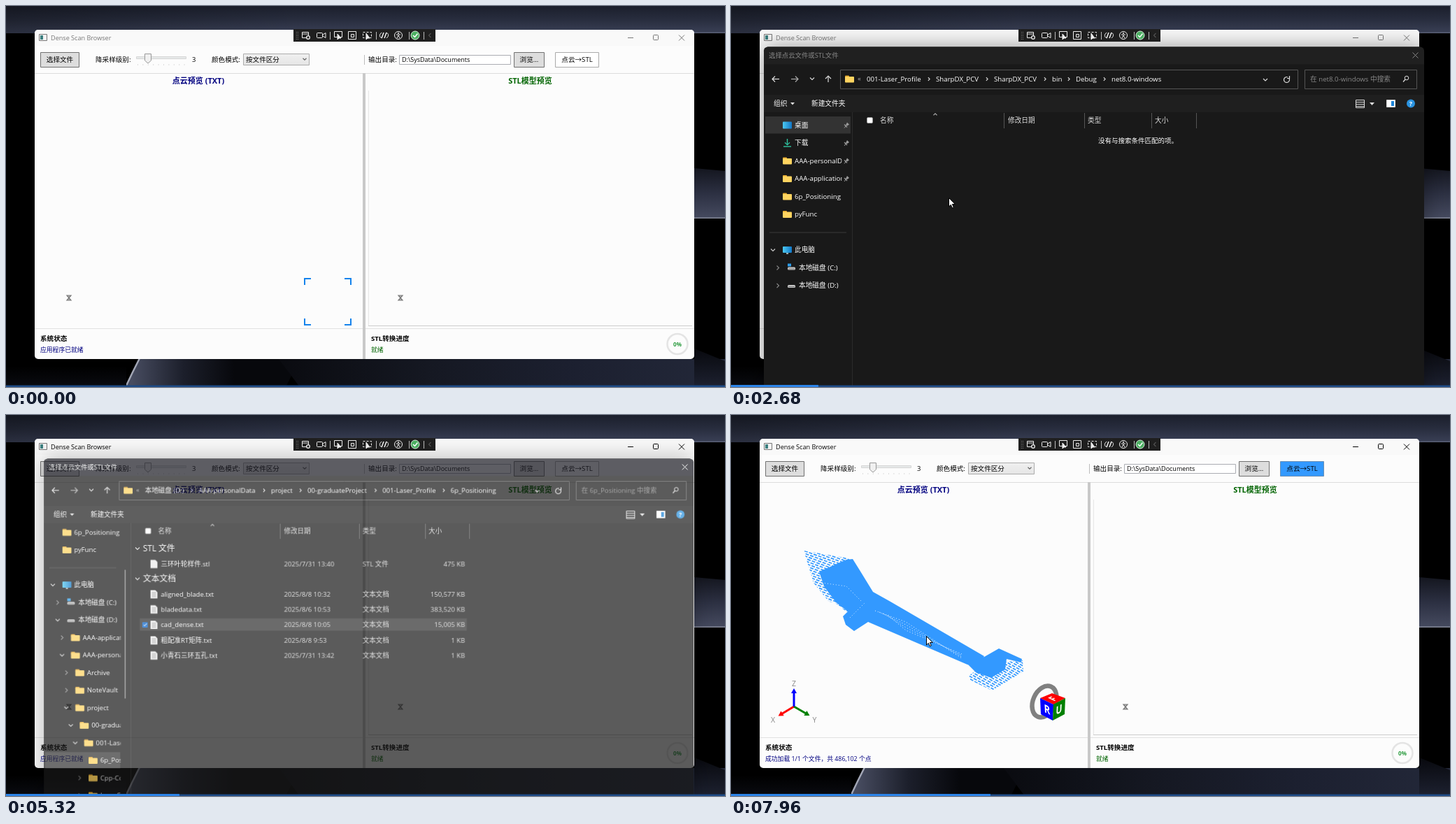
An HTML page with a canvas that plays this animation: 1028x545 px, repeating every 8000 ms.

```html
<!DOCTYPE html>
<html lang="zh-CN">
<head>
<meta charset="utf-8">
<style>
html, body { margin: 0; width: 100%; height: 100%; overflow: hidden; background: #000; }
canvas { display: block; }
</style>
</head>
<body>
<canvas id="stage" width="1028" height="545"></canvas>
<script>
const W = 1028, H = 545, LOOP = 8000, STEP = 40;
const screen2d = document.getElementById('stage').getContext('2d');
const layer = document.createElement('canvas');
layer.width = W; layer.height = 640;
const layer2d = layer.getContext('2d');
let g = screen2d;

// ---- drawing helpers ----
const clamp = v => Math.max(0, Math.min(1, v));
function text(s, x, y, color = '#000', size = 9.7, weight = 400, align = 'left') {
  g.font = `${weight} ${size}px "Open Sans", "Noto Sans CJK SC", "Noto Sans CJK", sans-serif`;
  g.textAlign = align;
  g.fillStyle = color;
  g.fillText(s, x, y + size * 0.36);
}
function box(x, y, w, h, fill, stroke, r = 0) {
  g.beginPath();
  g.roundRect(x, y, w, h, r);
  if (fill) { g.fillStyle = fill; g.fill(); }
  if (stroke) { g.strokeStyle = stroke; g.lineWidth = 1; g.stroke(); }
}
function path(pts, stroke, width = 1, fill, close) {
  g.beginPath();
  for (let i = 0; i < pts.length; i += 2) g.lineTo(pts[i], pts[i + 1]);
  if (close || fill) g.closePath();
  if (fill) { g.fillStyle = fill; g.fill(); }
  if (stroke) { g.strokeStyle = stroke; g.lineWidth = width; g.stroke(); }
}
function circle(x, y, r, fill, stroke, width = 1) {
  g.beginPath();
  g.arc(x, y, r, 0, 7);
  if (fill) { g.fillStyle = fill; g.fill(); }
  if (stroke) { g.strokeStyle = stroke; g.lineWidth = width; g.stroke(); }
}
function ramp(x0, y0, x1, y1, ...colors) {
  const grad = g.createLinearGradient(x0, y0, x1, y1);
  colors.forEach((c, i) => grad.addColorStop(i / (colors.length - 1), c));
  return grad;
}
// dir: 0 right, 1 down, 2 left, 3 up
function chevron(x, y, dir, color = '#ccc', r = 3) {
  g.save();
  g.translate(x, y);
  g.rotate(dir * Math.PI / 2);
  path([-r / 2, -r, r / 2, 0, -r / 2, r], color, 1.1);
  g.restore();
}
function button(x, w, label, fill, border, color = '#000') {
  box(x + .5, 66.5, w, 21, fill, border);
  text(label, x + w / 2 + .5, 77, color, 9.6, 400, 'center');
}

// ---- desktop ----
function wallpaper() {
  box(0, 0, W, H, '#000');
  box(0, 0, W, 39, ramp(0, 0, 0, 39, '#1b1f2c', '#282d3e', '#3a4056'));
  box(0, 0, 420, 39, ramp(0, 0, 420, 0, '#0004', '#0000'));
  box(600, 37.5, 428, 1.5, ramp(600, 0, W, 0, '#3a4056', '#5c6278'));
  path([984, 232, W, 236, W, 304, 984, 304], 0, 0, ramp(0, 232, 0, 304, '#14161f', '#2c3042', '#464b60'));
  box(984, 302.5, 44, 1.5, '#85899a');
  path([191, 505, 420, 505, 400, H, 172, H], 0, 0, ramp(180, 0, 400, 0, '#474c60', '#1c1f2b', '#07080c', '#07080c'));
  path([191, 504, 181, 524, 171, H], '#a3a7b6', 2.5);
  path([390, 505, W, 505, W, 545, 420, 545], 0, 0, ramp(390, 0, W, 0, '#0a0b10', '#151822', '#1c2030', '#232839'));
  path([984, 490, W, 508, W, 545, 984, 545], 0, 0, ramp(0, 490, 0, 545, '#08090e', '#1d2130'));
  box(0, 515, 172, 30, ramp(0, 515, 0, 545, '#000', '#0a0b11'));
}

function recorderBar() {
  const c = '#eee';
  box(411, 33, 203, 18, '#1f1f1f');
  for (let i = 0; i < 10; i++) box(415 + i % 2 * 2, 37 + (i >> 1) * 2.5, 1, 1, '#777');
  [463, 529, 576, 597].forEach(x => box(x, 37, 1, 11, '#bbb'));
  box(423.5, 37.5, 9, 8, 0, c);
  path([423, 40, 433, 40], c);
  circle(432, 45, 2.3, '#1f1f1f', c, 1.3);
  box(444.5, 38.5, 8, 7, 0, c, 1);
  path([453, 41, 457, 38.5, 457, 45.5, 453, 43], c);
  box(469.5, 36.5, 11, 8, 0, c);
  path([474, 40, 474, 48, 476, 46, 479, 46], c, 1, c);
  box(489.5, 36.5, 11, 11, 0, c);
  box(493.5, 40.5, 4, 4, 0, c);
  g.setLineDash([3, 2]);
  box(510.5, 37.5, 12, 8, 0, c);
  g.setLineDash([]);
  path([515, 39, 515, 48, 517, 46, 520, 46], c, 1, c);
  g.strokeStyle = c;
  [[538.5, 1.9, 4.4], [542.5, -1.2, 1.2]].forEach(([x, from, to]) => {
    g.beginPath();
    g.arc(x, 42, 4, from, to);
    g.stroke();
  });
  path([537, 46, 540, 38], c, 1.5);
  path([541, 46, 544, 38], c, 1.5);
  circle(561, 42, 5.5, 0, c);
  path([558, 41, 564, 41], c);
  path([559, 46, 561, 42, 563, 46], c);
  circle(561, 39, 1, c);
  circle(585, 42, 6, '#4caf62', '#d8efdc');
  path([582, 42, 584.5, 44.5, 588.5, 39.5], '#fff', 1.5);
  chevron(606, 42, 2, '#555');
}

// ---- main window ----
const hourglass = x => {
  path([x - 3, 414, x + 3, 414, x - 3, 421, x + 3, 421], '#777', 1.2, '#bbb');
};

function appWindow(t) {
  const active = t >= 5240, ink = active ? '#000' : '#777';
  box(41, 34, 943, 471, '#fcfcfc', 0, 5);
  box(41, 34, 943, 23, '#f9f9f9', 0, 5);
  box(47.5, 40.5, 11, 9, '#f4f4f4', '#777');
  box(49, 42, 4, 6, '#3c8080');
  text('Dense Scan Browser', 64, 46, ink, 9.1);
  path([889, 45.5, 897, 45.5], ink);
  box(925.5, 41.5, 7, 7, 0, ink, 1);
  path([962, 41.5, 970, 49.5], ink);
  path([970, 41.5, 962, 49.5], ink);

  const busy = t >= 5560 && t < 7440;
  const hover = t >= 680 && t < 1400;
  const back = clamp((t - 7440) / 240);
  const shade = Math.round(244 - 23 * back);
  if (busy || (t >= 7440 && back < 1)) button(49, 55, '选择文件', `rgb(${shade},${shade},${shade})`, '#adb2b5', back ? '#444' : '#838383');
  else button(49, 55, '选择文件', hover ? '#bee6fd' : '#ddd', hover ? '#3c7fb1' : '#707070');

  text('降采样级别:', 128, 77, '#000', 9.6);
  box(186.5, 72.5, 71, 3, '#e7eaea', '#d6d6d6');
  for (let i = 0; i < 10; i++) box(188 + i * 7.4, 83, 1, 2, '#ddd');
  path([198.5, 68.5, 207.5, 68.5, 207.5, 78, 203, 82, 198.5, 78], '#999', 1, '#f0f0f0');
  text('3', 266, 77, '#000', 9.4);
  text('颜色模式:', 294, 77, '#000', 9.6);
  box(339.5, 68.5, 94, 16, ramp(0, 68, 0, 85, '#f0f0f0', '#e5e5e5'), '#acacac');
  text('按文件区分', 343, 77, '#000', 9.6);
  chevron(427, 76, 1, '#606060', 2.5);
  box(512, 70, 1, 14, '#bbb');
  text('输出目录:', 518, 77, '#000', 9.6);
  box(562.5, 70.5, 159, 13, '#fff', '#abadb3');
  text('D:\\SysData\\Documents', 566, 77, '#000', 9);
  button(726, 43, '浏览...', '#ddd', '#707070');
  if (t >= 7640) button(785, 62, '点云→STL', '#3399ff', '#6a8fb5');
  else button(785, 62, '点云→STL', '#fff', '#aaa');

  box(41, 96, 943, 1, '#ddd');
  box(510, 96, 4, 409, '#c9c9c9');
  text('点云预览 (TXT)', 275, 107, '#000080', 11, 700, 'center');
  text('STL模型预览', 749.5, 107, '#006400', 11, 700, 'center');
  box(518, 121, 1, 337, '#e6e6e6');
  box(518, 457, 463, 1, '#ccc');
  box(41, 461, 469, 1, '#e2e2e2');
  box(514, 461, 470, 1, '#e2e2e2');
  hourglass(564);

  text('系统状态', 49, 476, '#000', 9.6, 700);
  const status = t < 5560 ? '应用程序已就绪'
    : t < 7200 ? '加载文件 1/1: cad_dense.txt'
    : '成功加载 1/1 个文件，共 486,102 个点';
  text(status, 49, 492, '#000080', 8.8);
  text('STL转换进度', 522, 476, '#000', 9.6, 700);
  text('就绪', 522, 492, '#006400', 8.8);
  circle(960, 483.5, 14.5, 0, '#e4e4e4', 2.5);
  text('0%', 960, 484, '#289a3c', 8, 700, 'center');

  if (t >= 7200) scene();
  else hourglass(90);
  if (t < 200) {
    [[427, 390, 1, 1], [493, 390, -1, 1], [427, 456, 1, -1], [493, 456, -1, -1]].forEach(([x, y, h, v]) =>
      path([x + 9 * h, y, x, y, x, y + 9 * v], '#1583ec', 2));
  }
}

// ---- point cloud, axes and view cube ----
const BLUE = '#3399ff';
function hatch(pts, angle) {
  g.save();
  path(pts, 0, 0, '#0000');
  g.clip();
  g.translate(pts[0], pts[1]);
  g.rotate(angle);
  g.setLineDash([5, 2]);
  for (let i = -40; i < 40; i++) path([-160 + i * 3 % 4, i * 3.3, 160, i * 3.3], BLUE, 1.7);
  g.restore();
}
function arrow(x, y, color) {
  const a = Math.atan2(y - 417, x - 90);
  path([90, 417, x, y], color, 3);
  g.save();
  g.translate(x, y);
  g.rotate(a);
  path([4, 0, -3, -4, -3, 4], 0, 0, color);
  g.restore();
}
function face(pts, color, letter) {
  path(pts, 0, 0, color);
  const [x0, y0, x1, y1, , , x3, y3] = pts;
  g.save();
  g.transform((x1 - x0) / 20, (y1 - y0) / 20, (x3 - x0) / 20, (y3 - y0) / 20, x0, y0);
  text(letter, 10, 10, '#fff', 14, 700, 'center');
  g.restore();
}
function scene() {
  hatch([104, 194, 168, 205, 183, 222, 200, 250, 166, 282, 148, 268, 140, 267, 118, 240], 0.35);
  hatch([340, 373, 362, 356, 417, 351, 418, 367, 373, 394, 342, 379], 0.5);
  path([126, 224, 165, 207, 174, 206, 184, 222, 203, 253, 228, 267, 362, 345, 352, 359, 338, 357,
    196, 296, 176, 309, 164, 300, 160, 288, 167, 281, 150, 268, 133, 245], 0, 0, BLUE);
  path([336, 354, 362, 346, 383, 334, 416, 349, 415, 354, 394, 349, 392, 364, 372, 376, 350, 368], 0, 0, BLUE);
  g.setLineDash([1, 3]);
  for (let i = 0; i < 4; i++) path([206 + i * 6, 280 + i * 2, 250, 296 + i * 4, 330, 348 - i * 2], '#fff', 0.9);
  path([130, 240, 165, 245, 188, 268], '#fff', 0.8);
  path([170, 290, 192, 268], '#fff', 0.8);
  g.setLineDash([]);

  arrow(71, 428.5, '#f00');
  arrow(109, 428, '#008000');
  arrow(90, 395, '#00f');
  [['Z', 90, 384], ['X', 60, 436], ['Y', 119.5, 436]].forEach(([s, x, y]) => text(s, x, y, '#888', 10.5, 400, 'center'));

  g.beginPath();
  g.ellipse(448, 410, 16, 23.5, 0.42, 0, 7);
  g.strokeStyle = '#808080';
  g.lineWidth = 6.5;
  g.stroke();
  face([442, 405, 459, 398, 478, 405, 461, 414], '#f00', 'F');
  face([442, 405, 461, 414, 460, 437, 443, 428], '#00f', 'R');
  face([461, 414, 478, 405, 477, 428, 460, 437], '#008000', 'U');
}

// ---- file dialog ----
function folder(x, y) {
  box(x, y - 5, 6, 4, '#e8a92c', 0, 1);
  box(x, y - 3.5, 13, 8.5, '#ffd460', 0, 1);
}
function drive(x, y, system) {
  box(x, y - 1, 11, 4, '#c8c8c8', 0, 1.5);
  box(x + 1, y + 1, 9, 1, '#777');
  if (system) box(x, y - 6, 5, 4, '#2a9be8');
}
function monitor(x, y) {
  box(x, y - 5, 13, 9, ramp(x, 0, x + 13, 0, '#4cc9f0', '#1277c8'), 0, 1);
  box(x + 5, y + 4, 3, 2, '#9aa');
}
function pin(x, y) {
  path([x - 3, y + 4, x, y], '#999', 1);
  path([x - 3, y - 1, x + 1, y + 3], '#999', 1.3);
  path([x - 1, y, x + 1, y - 4, x + 4, y - 1, x + 1, y + 1], 0, 0, '#999');
}
function tree(shift, expanded, open) {
  const row = i => 170.5 + i * 25.5 - shift;
  const label = (s, x, y) => text(s, x, y, '#fff');
  g.save();
  g.beginPath();
  g.rect(47, 153, 126, 487);
  g.clip();
  if (expanded) box(49, 485, 109, 24, '#333');
  else if (open) box(49, 158, 122, 24.5, '#333');
  const names = ['桌面', '下载', 'AAA-personalData', 'AAA-application', '6p_Positioning', 'pyFunc'];
  const deeper = [['AAA-application', 1, 0], ['AAA-personalData', 1, 1], ['Archive', 2, 0], ['NoteVault', 2, 0],
    ['project', 2, 1], ['00-graduateProject', 3, 1], ['001-Laser_Profile', 4, 1], ['6p_Positioning', 5],
    ['Cpp-Converter', 5, 0], ['LaserScan', 5, 0]];
  names.forEach((n, i) => {
    const y = row(i);
    if (i > 1) folder(74, y);
    if (i < 4) pin(165, y);
  });
  box(74, row(0) - 5, 13, 10, ramp(74, 0, 87, 0, '#4cc9f0', '#1277c8'), 0, 1);
  path([80.5, row(1) - 6, 80.5, row(1) + 2], '#2fc4a0', 1.4);
  chevron(80.5, row(1) + 1, 1, '#2fc4a0', 3.5);
  path([75, row(1) + 5, 86, row(1) + 5], '#2fc4a0', 1.4);
  if (open) box(55, row(6), expanded ? 97 : 110, 1, '#3a3a3a');
  chevron(60, row(7), 1);
  monitor(74, row(7));
  chevron(67, row(8), 0, '#888');
  drive(81, row(8), true);
  chevron(67, row(9), expanded ? 1 : 0, expanded ? '#ccc' : '#888');
  drive(81, row(9));
  if (expanded) {
    deeper.forEach(([, depth, down], i) => {
      const x = 67 + depth * 6.4, y = row(10 + i);
      if (down !== undefined) chevron(x, y, down, down ? '#ccc' : '#888');
      folder(x + 13, y);
    });
    box(164.5, 220, 1.5, 187, '#8c8c8c');
  }
  g.beginPath();
  g.rect(47, 153, 111.5, 487);
  g.clip();
  names.forEach((n, i) => label(n, 91, row(i)));
  label('此电脑', 91, row(7));
  label('本地磁盘 (C:)', 97, row(8));
  label('本地磁盘 (D:)', 97, row(9));
  if (expanded) deeper.forEach(([n, depth], i) => label(n, 97 + depth * 6.4, row(10 + i)));
  g.restore();
}

const ROUTE_OLD = [['001-Laser_Profile', 194], ['SharpDX_PCV', 293], ['SharpDX_PCV', 376], ['bin', 459], ['Debug', 493], ['net8.0-windows', 544]];
const ROUTE_NEW = [['本地磁盘 (D:)', 194], ['AAA-personalData', 272], ['project', 377], ['00-graduateProject', 430], ['001-Laser_Profile', 539], ['6p_Positioning', 638]];
const FILES = [
  [211.5, '三环叶轮样件.stl', '2025/7/31 13:40', 'STL 文件', '475 KB'],
  [255.5, 'aligned_blade.txt', '2025/8/8 10:32', '文本文档', '150,577 KB'],
  [277.5, 'bladedata.txt', '2025/8/6 10:53', '文本文档', '383,520 KB'],
  [300, 'cad_dense.txt', '2025/8/8 10:05', '文本文档', '15,005 KB'],
  [322.5, '粗配准RT矩阵.txt', '2025/8/8 9:53', '文本文档', '1 KB'],
  [344.5, '小青石三环五孔.txt', '2025/7/31 13:42', '文本文档', '1 KB']];

function navigation(visited) {
  const c = '#ddd';
  [[64, -1, '#ddd'], [91, 1, '#aaa']].forEach(([x, d, col]) => {
    path([x - 5, 104.5, x + 5, 104.5], col, 1.2);
    path([x + d, 100.5, x + 5 * d, 104.5, x + d, 108.5], col, 1.2);
  });
  chevron(116, 104, 1, c);
  path([139, 109, 139, 100], c, 1.2);
  path([135, 104, 139, 100, 143, 104], c, 1.2);
  box(156.5, 91.5, 654, 27, '#191919', '#555');
  folder(163, 104.5);
  text('«', 181, 103.5, '#aaa');
  (visited ? ROUTE_NEW : ROUTE_OLD).forEach(([name, x], i) => {
    if (i) chevron(x - 10, 104.5, 0, c, 2.3);
    text(name, x, 104.5, '#fff');
  });
  chevron(764, 105.5, 1, c);
  g.beginPath();
  g.arc(794.5, 105.5, 4, -0.6, 5);
  g.strokeStyle = c;
  g.lineWidth = 1.2;
  g.stroke();
  path([798.5, 100, 798.5, 103.5, 795, 103.5], c, 1.2);
  box(820.5, 91.5, 160, 27, '#191919', '#555');
  text(`在 ${visited ? '6p_Positioning' : 'net8.0-windows'} 中搜索`, 828, 104.5, '#888');
  circle(966, 103, 2.8, 0, c);
  path([964, 105, 961, 108.5], c, 1.2);
  text('组织', 61, 140, '#fff');
  text('新建文件夹', 115, 140, '#fff');
  path([85, 138, 91, 138, 88, 141.5], 0, 0, c);
  box(893.5, 134.5, 12, 11, 0, c);
  for (let i = 0; i < 3; i++) box(894, 137 + i * 3, 11, 1, c);
  path([913, 138, 920, 138, 916.5, 142], 0, 0, c);
}

function fileList(t) {
  const grey = '#ddd';
  ['STL 文件', '文本文档'].forEach((title, i) => {
    chevron(183, 189 + i * 44, 1, grey);
    text(title, 191, 189 + i * 44, '#fff', 12);
  });
  if (t >= 3640) {
    const picked = t >= 3800, lit = picked && t < 5240;
    box(186.5, 290.5, 475, 18, !lit ? '#303030' : t < 4000 ? '#777' : '#4d4d4d', lit ? '#bbb' : 0);
    if (picked) {
      box(190, 296, 8, 8, '#0a64c8', 0, 1);
      path([192, 300, 193.5, 301.5, 196.5, 298], '#fff');
    }
  }
  FILES.forEach(([y, name, date, type, size], i) => {
    path([202, y - 6, 209, y - 6, 212, y - 3, 212, y + 6, 202, y + 6], 0, 0, '#eee');
    if (i) for (let k = 0; k < 4; k++) box(204, y - 3 + k * 2, 6, 0.8, '#888');
    text(name, 217, y, '#fff');
    text(date, 396, y, grey);
    text(type, 510, y, grey);
    text(size, 659, y, grey, 9.7, 400, 'right');
  });
}

function dialog(t) {
  const opened = t >= 1720, visited = t >= 3040, focused = t < 1800 || t >= 2920;
  box(47, 58.5, 944, 560, '#191919', 0, 6);
  box(47, 58.5, 944, 25, opened ? (focused ? '#1b1c24' : '#202020') : '#191919', 0, [6, 6, 0, 0]);
  const ink = focused ? '#fff' : '#888';
  text('选择点云文件或STL文件', 54, 70.5, ink, 9.4);
  path([974.5, 66.5, 982.5, 74.5], ink);
  path([982.5, 66.5, 974.5, 74.5], ink);
  if (opened) {
    box(47, 127, 944, 25, '#1f1f1f');
    box(173, 152, 1, 470, '#2b2b2b');
    navigation(visited);
  } else {
    box(155, 83.5, 656, 42.5, '#fff');
    box(818.5, 89, 163.5, 32, '#fff');
    box(49.5, 92, 105.5, 26.5, '#fff');
  }
  box(937.5, 134.5, 12, 10, '#fff', '#ddd');
  box(944, 136, 4, 7, '#1c84d8');
  circle(972, 139.5, 6, '#2a93e0');
  text('?', 972, 139.5, '#fff', 9, 700, 'center');

  tree(t >= 3160 ? 107 : 0, t >= 3160, opened);
  box(194.5, 159.5, 8, 8, '#fff', '#999', 1.5);
  chevron(292, 155, 3, '#aaa', 2.5);
  [['名称', 213, 390], ['修改日期', 396, 505], ['类型', 510, 601], ['大小', 606, 665]].forEach(([s, x, end]) => {
    text(s, x, 163.5, '#ddd');
    box(end, 153, 1, 22, '#555');
  });
  if (visited) fileList(t);
  else text('没有与搜索条件匹配的项。', 525, 193, '#fff', 9.5);
}

// Soft shadow around the dialog only, so the fading sheet stays clear
function dialogShadow() {
  g.save();
  g.beginPath();
  g.rect(-200, -200, W + 400, H + 500);
  g.roundRect(47, 58.5, 944, 560, 6);
  g.clip('evenodd');
  g.shadowColor = 'rgba(0,0,0,.4)';
  g.shadowBlur = 30;
  box(47, 58.5, 944, 560, '#191919', 0, 6);
  g.restore();
}

function showDialog(t) {
  if (t < 1560 || t >= 5488) return;
  const p = clamp((t - 1556) / 200), q = clamp((t - 5288) / 200);
  const scale = q ? 1 - 0.1 * q : 0.9 + 0.1 * p;
  const [cx, cy] = q ? [490, 312] : [469, 298];
  g = layer2d;
  g.clearRect(0, 0, W, 640);
  dialog(t);
  g = screen2d;
  g.save();
  g.globalAlpha = q ? (1 - q) ** 2 : 1 - (1 - p) ** 3;
  g.translate(cx, cy);
  g.scale(scale, scale);
  g.translate(-cx, -cy);
  dialogShadow();
  g.drawImage(layer, 0, 0);
  g.restore();
}

// ---- pointer: time, x, y ----
const POINTER = [[0, 594, 543], [720, 78, 74], [1480, 78, 74], [1720, 300, 268], [2680, 311, 274], [2920, 125, 272],
  [3160, 125, 274], [3400, 157, 270], [3680, 250, 297], [3920, 256, 299], [4400, 472, 417], [4520, 472, 417],
  [4960, 711, 546], [5400, 711, 560], [5880, 317, 346], [6000, 304, 342], [6560, 274, 333], [7000, 279, 316], [8000, 279, 316]];
function pointer(t) {
  if (t > 1480 && t < 1720) return;
  const i = POINTER.findIndex((k, n) => n && t < k[0]);
  const [t0, x0, y0] = POINTER[i - 1], [t1, x1, y1] = POINTER[i];
  const p = (t - t0) / (t1 - t0), e = p * p * (3 - 2 * p);
  g.save();
  g.translate(x0 + (x1 - x0) * e + .5, y0 + (y1 - y0) * e + .5);
  path([0, 0, 0, 12.5, 2.8, 9.8, 4.8, 14.3, 6.8, 13.4, 4.9, 9, 8.8, 9], '#000', 1, '#fff');
  g.restore();
}

function progress(t) {
  box(0, 542.5, W, 2.5, '#1d4a86');
  box(0, 542, t * 0.0466, 3, '#2b83e8');
}

function frame(now) {
  const t = Math.floor(now % LOOP / STEP) * STEP;
  g.clearRect(0, 0, W, H);
  wallpaper();
  appWindow(t);
  showDialog(t);
  recorderBar();
  pointer(t);
  progress(t);
  requestAnimationFrame(frame);
}
requestAnimationFrame(frame);
</script>
</body>
</html>
```
